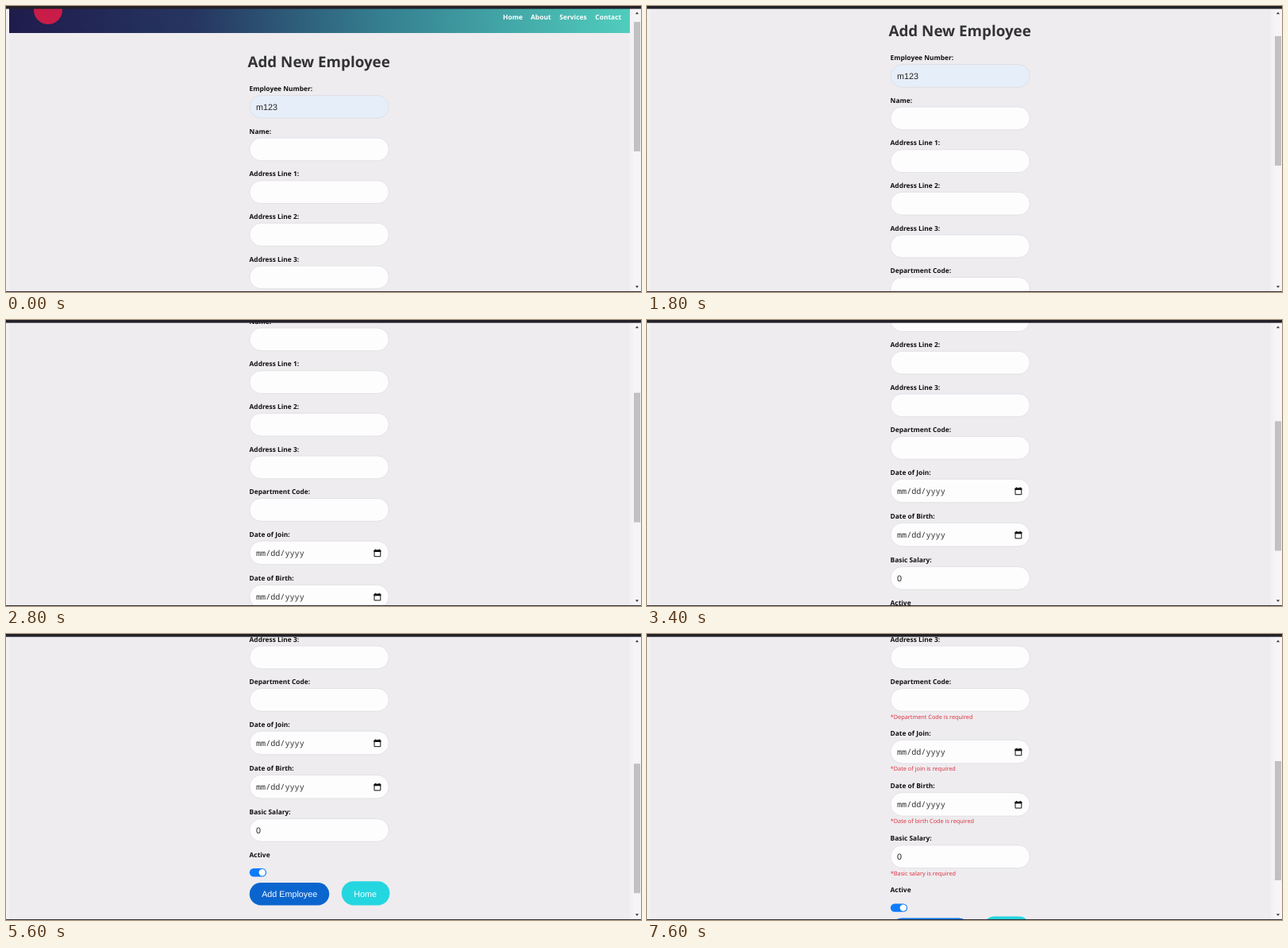
An HTML page for the animation above (8 s loop, 800x360 px).

```html
<!DOCTYPE html>
<html lang="en">
<head>
<meta charset="utf-8">
<title>Add New Employee</title>
<style>
  html, body { margin: 0; width: 100%; height: 100%; overflow: hidden; background: #eeecef; }
  svg { display: block; width: 100vw; height: 100vh; }
  text { font-family: "Noto Sans", sans-serif; text-rendering: geometricPrecision; white-space: pre; }
  .label { font-size: 8.4px; font-weight: 700; fill: #111; }
  .title { font-size: 18.8px; font-weight: 700; fill: #333; }
  .nav { font-size: 8.45px; font-weight: 700; fill: #fff; }
  .error { font-size: 7.29px; fill: #dc3545; }
  .value, .button { font-family: "Liberation Sans", Arial, sans-serif; font-size: 10.75px; fill: #222; }
  .button { fill: #fff; }
  .date { font-family: "Noto Sans Mono", monospace; font-size: 10.15px; fill: #333; }
  .field { fill: #fdfdfe; stroke: #dddce0; stroke-width: .8; }
  .filled { fill: #e6eef9; }
</style>
</head>
<body>
<svg viewBox="0 0 800 360" preserveAspectRatio="none">
  <defs>
    <linearGradient id="banner">
      <stop offset="0" stop-color="#1f1c4c"/>
      <stop offset=".3" stop-color="#263660"/>
      <stop offset=".6" stop-color="#357f90"/>
      <stop offset="1" stop-color="#50cdbd"/>
    </linearGradient>
  </defs>
  <rect width="800" height="360" fill="#f4f1f5"/>
  <rect x="4" width="782" height="360" fill="#eeecef"/>
  <g id="page">
    <rect x="4" y="-30" width="782" height="64" fill="url(#banner)"/>
    <circle cx="53" cy="5" r="18" fill="#c91c48"/>
  </g>
  <rect x="790" width="10" height="360" fill="#f6f4f7"/>
  <rect id="thumb" x="791" width="8" fill="#c1c0c2"/>
  <path d="M792.8 10.3h4.4l-2.2-2.8zM792.8 352.2h4.4l-2.2 2.8z" fill="#444"/>
  <rect width="800" height="3.6" fill="#232128"/>
  <rect y="359" width="800" height="1" fill="#333136"/>
</svg>
<script>
const LOOP = 8000, HOVER_AT = 4800, HOVER_FADE = 150, ERRORS_AT = 6600;
const TICK = 39, ERROR_GAP = 11.1;
const SCROLL_TIMES = [1600, 2000, 2400, 2800, 3000, 3400, 3800, 4000];

const page = document.getElementById('page');
const thumb = document.getElementById('thumb');

function add(parent, tag, attrs, content = '') {
  const node = document.createElementNS('http://www.w3.org/2000/svg', tag);
  for (const key in attrs) node.setAttribute(key, attrs[key]);
  node.textContent = content;
  parent.append(node);
  return node;
}
const write = (parent, style, x, y, content) =>
  add(parent, 'text', { class: style, x, y }, content);
const pill = (parent, x, y, width, height, attrs) =>
  add(parent, 'rect', { x, y, width, height, rx: height / 2, ...attrs });

[['Home', 626], ['About', 661], ['Services', 697.3], ['Contact', 742.3]]
  .forEach(([name, x]) => write(page, 'nav', x, 17, name));
write(page, 'title', 304.5, 77, 'Add New Employee');

// label, label baseline, kind of value, value, error
const FIELDS = [
  ['Employee Number:', 107, 'value', 'm123'],
  ['Name:', 160.5],
  ['Address Line 1:', 214.3],
  ['Address Line 2:', 267.8],
  ['Address Line 3:', 321.5],
  ['Department Code:', 375, '', '', '*Department Code is required'],
  ['Date of Join:', 428.7, 'date', 'mm/dd/yyyy', '*Date of join is required'],
  ['Date of Birth:', 483.9, 'date', 'mm/dd/yyyy', '*Date of birth Code is required'],
  ['Basic Salary:', 539, 'value', '0', '*Basic salary is required']
];
const errors = [], shifted = [];

function addRow() {
  const row = add(page, 'g', {});
  shifted.push({ row, gap: errors.length * ERROR_GAP });
  return row;
}

FIELDS.forEach(([label, y, kind, value, error], i) => {
  const row = addRow();
  const top = y + 5.5, height = kind === 'date' ? 29.6 : 28.8;
  write(row, 'label', 306.6, y, label);
  pill(row, 306.9, top, 175.4, height, { class: i ? 'field' : 'field filled' });
  if (kind) write(row, kind, 315, top + (kind === 'date' ? 18.9 : 18), value);
  if (kind === 'date') {
    add(row, 'path', {
      d: `M464 ${top + 11.8}h7.8v7.7h-7.8z`, fill: 'none', stroke: '#111', 'stroke-width': 1
    });
    add(row, 'path', {
      d: `M463.5 ${top + 11.3}h8.8v2.6h-8.8zM465 ${top + 10.4}h1.2v1h-1.2zM469.6 ${top + 10.4}h1.2v1h-1.2z`,
      fill: '#111'
    });
  }
  if (error) errors.push(write(row, 'error', 306.8, top + height + 9.2, error));
});

const footer = addRow();
write(footer, 'label', 306.6, 592.8, 'Active');
pill(footer, 306.8, 607, 21.3, 10.4, { fill: '#0d7bfa' });
add(footer, 'circle', { cx: 322.8, cy: 612.2, r: 4.2, fill: '#fff' });
const submit = pill(footer, 306.8, 625, 100.4, 28.4, {});
write(footer, 'button', 322.2, 643, 'Add Employee');
pill(footer, 422.8, 623.2, 60.6, 30.2, { fill: '#24d6e0' });
write(footer, 'button', 438.2, 643, 'Home');

const mix = (from, to, k) => `rgb(${from.map((c, i) => Math.round(c + (to[i] - c) * k))})`;

function draw(t) {
  const scroll = TICK * SCROLL_TIMES.filter(time => t >= time).length;
  const invalid = t >= ERRORS_AT;
  page.setAttribute('transform', `translate(0 ${-scroll})`);
  shifted.forEach(({ row, gap }) =>
    row.setAttribute('transform', `translate(0 ${invalid ? gap : 0})`));
  errors.forEach(node => node.setAttribute('visibility', invalid ? 'visible' : 'hidden'));
  const hover = invalid ? 0 : Math.min(1, Math.max(0, (t - HOVER_AT) / HOVER_FADE));
  submit.setAttribute('fill', mix([10, 124, 255], [11, 101, 206], hover));
  thumb.setAttribute('y', invalid ? 160 : 20 + scroll * 0.459);
  thumb.setAttribute('height', invalid ? 150 : 163);
}

const start = performance.now();
function frame() {
  draw((performance.now() - start) % LOOP);
  requestAnimationFrame(frame);
}
frame();
</script>
</body>
</html>
```
